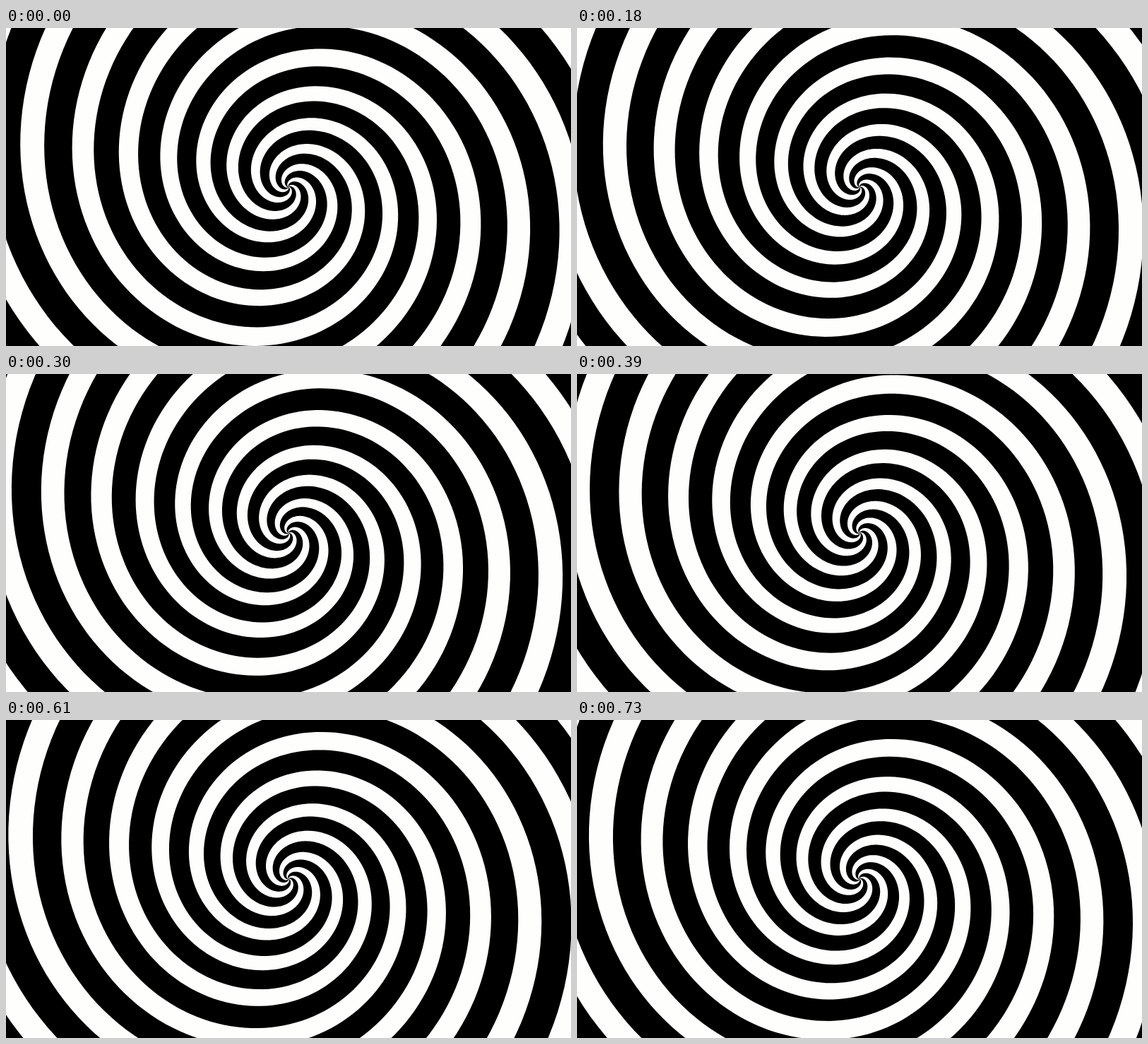
An HTML page that plays this animation: 800 px wide and 450 px high, repeating every 760 ms.

```html
<!DOCTYPE html>
<html lang="en">
<head>
<meta charset="utf-8">
<title>Spiral</title>
<style>
  html, body { margin: 0; width: 100%; height: 100%; overflow: hidden; background: #000; }
  svg { display: block; width: 800px; height: 450px; }
</style>
</head>
<body>
<svg viewBox="0 0 800 450">
  <rect width="800" height="450" fill="#000"/>
  <path id="spiral" fill="#fefefc"/>
</svg>
<script>
const LOOP = 760;
const ARMS = 5;
const STEPS = 23;
const POWER = 0.55;              // radius ** POWER grows linearly with the angle
const PITCH = 2.946;             // growth between neighbouring arms
const WIDTH = 1.325;             // white part of one pitch
const START = 17.2;
const REACH = 34;
const RATE = ARMS * PITCH / (2 * Math.PI);

const spiral = document.getElementById('spiral');

function point(g, offset, turn) {
  const r = g ** (1 / POWER);
  const a = Math.PI + turn + (g - offset) / RATE;
  return (r * Math.cos(a)).toFixed(2) + ' ' + (r * Math.sin(a)).toFixed(2);
}

function arm(turn) {
  const outer = [], inner = [];
  for (let g = 0; g <= REACH; g += 0.1) {
    outer.push(point(g, START, turn));
    inner.push(point(g, START - WIDTH, turn));
  }
  return 'M' + outer.concat(inner.reverse()).join('L') + 'Z';
}

// Steps last 30 ms, apart from two longer holds.
function stepAt(t) {
  if (t >= 90) t -= Math.min(30, t - 90);
  if (t >= 420) t -= Math.min(40, t - 420);
  return Math.min(STEPS - 1, Math.floor(t / 30));
}

function draw(t) {
  const angle = stepAt(t % LOOP) / STEPS * 360 / ARMS;
  spiral.setAttribute('transform', `translate(400 225) rotate(${angle.toFixed(4)})`);
}

let d = '';
for (let i = 0; i < ARMS; i++) d += arm(i * 2 * Math.PI / ARMS);
spiral.setAttribute('d', d);

const origin = performance.now();
function tick() {
  draw(performance.now() - origin);
  requestAnimationFrame(tick);
}
draw(0);
requestAnimationFrame(tick);
</script>
</body>
</html>
```
